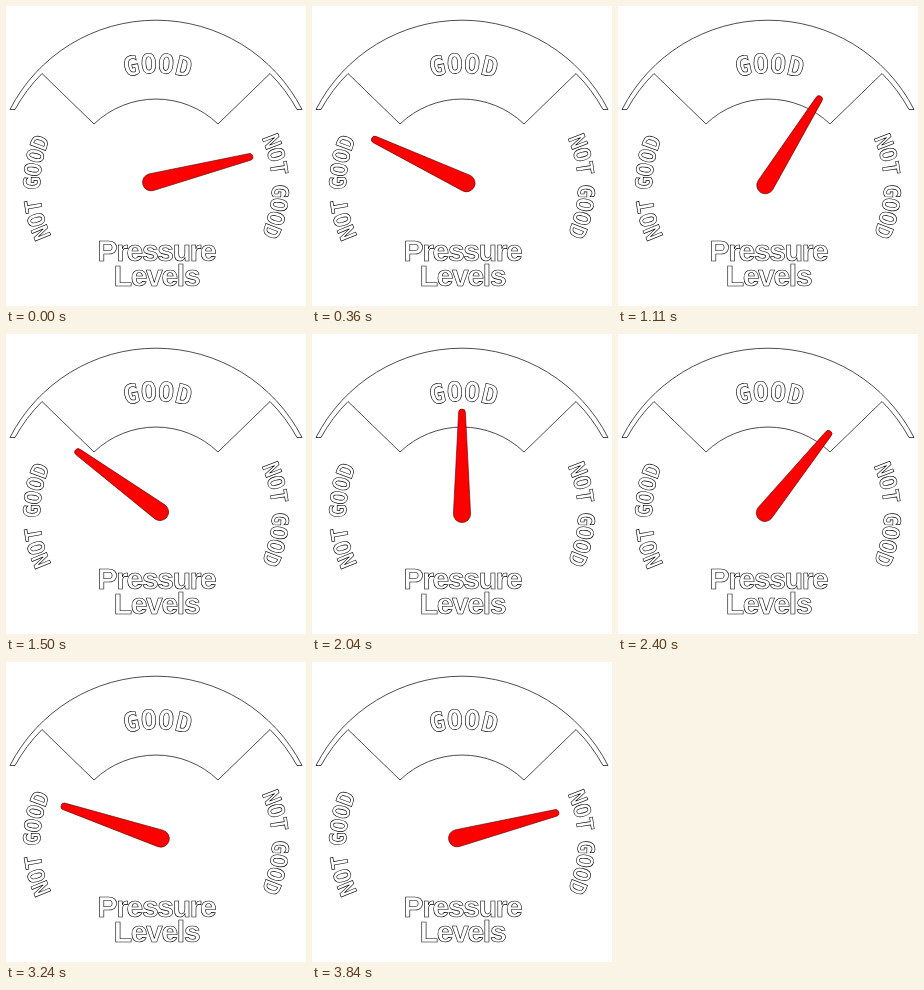
Animation, 300 px wide and 300 px high, one loop 3.87 s. Source, as an HTML page:

```html
<!DOCTYPE html>
<html lang="en">
<head>
<meta charset="utf-8">
<title>Pressure gauge</title>
<style>
  html, body { margin: 0; width: 100%; height: 100%; overflow: hidden; background: #fff; }
  svg { display: block; width: 100vw; height: 100vh; }
  text { font-weight: bold; text-anchor: middle; stroke-width: .6; }
  .line { fill: #fff; stroke: #000; stroke-width: .7; }
  .title { font-family: "Liberation Sans", Arial, sans-serif; font-size: 30px; letter-spacing: -1.3px; }
  .curved { font-family: "DejaVu Sans Mono", "Noto Sans Mono", monospace; }
  .top { font-size: 27px; }
  .side { font-size: 23px; letter-spacing: -1px; word-spacing: -4px; }
  #needle { fill: #f00; stroke: #500; stroke-width: .6; }
</style>
</head>
<body>
<svg viewBox="0 0 300 300">
  <defs>
    <!-- circles that start at the bottom and run clockwise -->
    <path id="topArc" d="M150 291 a112 112 0 0 1 0 -224 a112 112 0 0 1 0 224"/>
    <path id="sideArc" d="M150 296 a116 116 0 0 1 0 -232 a116 116 0 0 1 0 232"/>
  </defs>
  <g class="line">
    <path d="M4 103.5 A164 164 0 0 1 296 103.5 H291 A160 160 0 0 0 264 67.5
             L212 118 A89.5 89.5 0 0 0 88 118 L36 67.5 A160 160 0 0 0 9 103.5 Z"/>
    <text class="curved top"><textPath href="#topArc" startOffset="50.2%">GOOD</textPath></text>
    <text class="curved side"><textPath href="#sideArc" startOffset="24.7%">NOT GOOD</textPath></text>
    <text class="curved side"><textPath href="#sideArc" startOffset="75%">NOT GOOD</textPath></text>
    <text class="title" x="150.5" y="254.5">Pressure</text>
    <text class="title" x="150.5" y="279.5">Levels</text>
  </g>
  <path id="needle" d="M146.6 78.5 A3.4 3.4 0 0 1 153.4 78.5 L158.6 180 A8.6 8.6 0 0 1 141.4 180 Z"/>
</svg>
<script>
  const TICK = 30, LOOP = 3870, REST = 2;
  const needle = document.getElementById("needle");

  // each swing eases to an angle (degrees from upright), arriving at a tick
  const swings = [
    { to: 75.6, at: 0, rest: REST },
    { to: -64.6, at: 12 },
    { to: 69, at: 23 },
    { to: 75.6, at: 30.5 },
    { to: -54.2, at: 47, rest: REST },
    { to: 0, at: 68 },
    { to: 39.6, at: 77 },
    { to: 21.5, at: 99 },
    { to: -77, at: 109.6, rest: REST },
    { to: 75.6, at: 128 }
  ];

  const ease = u => (1 - Math.cos(Math.PI * Math.min(1, Math.max(0, u)))) / 2;

  // sum of all turns made so far
  function angleAt(tick) {
    let angle = swings[0].to;
    for (let i = 1; i < swings.length; i++) {
      const from = swings[i - 1], next = swings[i];
      const leave = from.at + (from.rest || 0);
      angle += (next.to - from.to) * ease((tick - leave) / (next.at - leave));
    }
    return angle;
  }

  function draw(ms) {
    const tick = Math.floor((ms % LOOP) / TICK);
    needle.setAttribute("transform", `rotate(${angleAt(tick).toFixed(2)} 150 175)`);
  }

  let start = null;
  function loop(now) {
    if (start === null) start = now;
    draw(Math.max(0, now - start));
    requestAnimationFrame(loop);
  }
  draw(0);
  requestAnimationFrame(loop);
</script>
</body>
</html>
```
